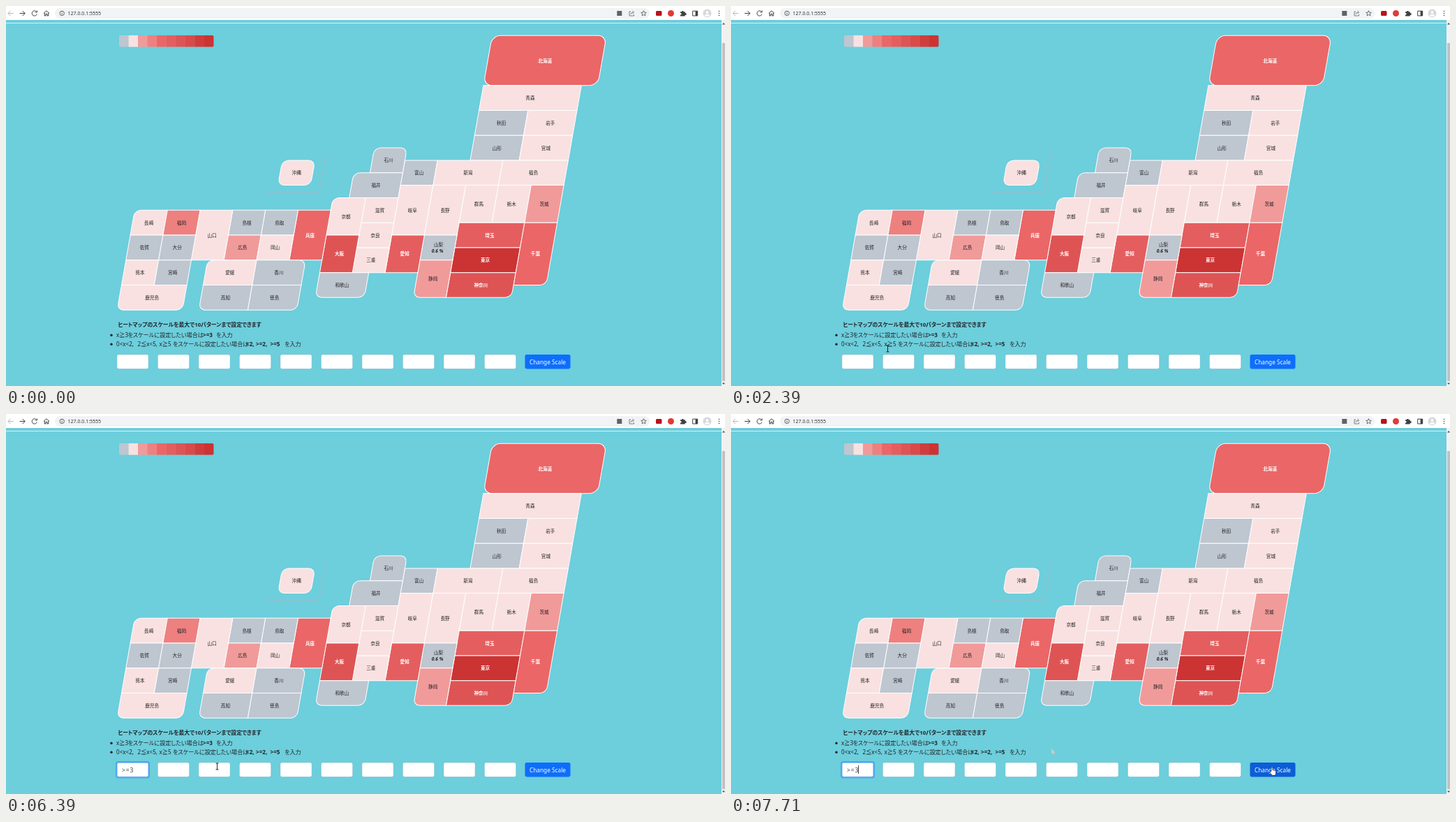
Animation of 1030 by 544 pixels, one loop 8000 ms. Source, as an HTML page with a canvas:

```html
<!DOCTYPE html>
<html lang="ja">
<head>
<meta charset="utf-8">
<title>Heat map scale</title>
<style>
html, body { margin: 0; width: 100%; height: 100%; overflow: hidden; background: #6dcedc; }
canvas, svg { position: absolute; left: 0; top: 0; width: 1030px; height: 544px; display: block; }
svg { overflow: hidden; }
text { font-family: "Noto Sans", "Noto Sans CJK JP", sans-serif; font-size: 8.1px; fill: #212529; white-space: pre; }
.ja { font-feature-settings: "palt"; }
.bold { font-weight: 600; }
</style>
</head>
<body>
<canvas id="page" width="1030" height="544"></canvas>
<svg viewBox="0 0 1030 544">
  <g class="ja">
    <text class="bold" x="160.5" y="458.5" style="font-size:7.8px">ヒートマップのスケールを最大で10パターンまで設定できます</text>
    <text x="158" y="474">x≧3</text>
    <text x="174.5" y="474">をスケールに設定したい場合は</text>
    <text class="bold" x="282" y="474">&gt;=3</text>
    <text x="301" y="474">を入力</text>
    <text x="158" y="487">0&lt;x&lt;2,</text>
    <text x="188.5" y="487">2≦x&lt;5,</text>
    <text x="219.5" y="487">x≧5</text>
    <text x="239" y="487">をスケールに設定したい場合は</text>
    <text class="bold" x="344" y="487">&lt;2,</text>
    <text class="bold" x="358" y="487">&gt;=2,</text>
    <text class="bold" x="378.5" y="487">&gt;=5</text>
    <text x="399" y="487">を入力</text>
  </g>
  <g id="focus">
    <rect x="158" y="498" width="47" height="22.5" rx="3" fill="none" stroke="#0d6efd" stroke-opacity=".4" stroke-width="2"/>
    <rect x="159.2" y="499.4" width="44.6" height="19.8" rx="2" fill="none" stroke="#86b7fe" stroke-width=".8"/>
  </g>
  <text id="typed" x="166" y="512.7" style="font-size:8.5px;letter-spacing:.85px;fill:#3a3f44"></text>
  <rect id="caret" y="503" width=".9" height="12" fill="#222"/>
  <rect id="button" x="743.5" y="499" width="65" height="20.5" rx="2.4"/>
  <text x="776" y="512.7" text-anchor="middle" style="font-size:8.3px;fill:#fff">Change Scale</text>
  <path id="trail" transform="translate(459 478.5)" fill="#c9c8ca" d="M0 0V8.6L2 6.8 3.3 9.8 4.6 9.2 3.4 6.4H6Z"/>
  <g id="pointer" stroke-linejoin="round">
    <path id="arrow" fill="#fff" stroke="#222" stroke-width=".7" d="M0 0V8.6L2 6.8 3.3 9.8 4.6 9.2 3.4 6.4H6Z"/>
    <path id="beam" fill="none" stroke="#111" stroke-width=".9" d="M-2-4.5H2M0-4.5V4.5M-2 4.5H2"/>
    <path id="hand" fill="#fff" stroke="#222" stroke-width=".7" d="M-1 6V1Q-1 0 0 0T1 1V4.2Q2 3.6 2.6 4.5 3.6 4 4.2 5 5.6 4.6 5.6 6V8.6Q5.4 10.4 4.6 11.8H-.2Q-1.4 9.6-3 7.6-3.4 6.4-2.2 6.4Z"/>
  </g>
</svg>
<script>
const $ = id => document.getElementById(id);
const ctx = $('page').getContext('2d');
const SCALE = ['#bec6d0', '#f9e1e1', '#f19a9a', '#ee8080', '#eb6667',
               '#e45e5f', '#de5455', '#d94a4a', '#d03c3c', '#cc3333'];
const LEFT = 228.5, TOP = 42.3, COL = 46.8, ROW = 35.72, SLANT = Math.tan(Math.PI / 18);

// name, column, row, width, height, scale step, rounded corners (a b c d clockwise from top left)
const REGIONS = `北海道 10 0 3.5 2 4 abcd|青森 10 2 3 1 1|秋田 10 3 1.5 1 0|岩手 11.5 3 1.5 1 1
山形 10 4 1.5 1 0|宮城 11.5 4 1.5 1 1|富山 8 5 1 1 0|新潟 9 5 2 1 1|福島 11 5 2 1 1
石川 7 4.5 1 1 0 ab|福井 6.5 5.5 1.5 1 0 a|岐阜 8 6 1 2 1|長野 9 6 1 2 1|群馬 10 6 1 1.5 1
栃木 11 6 1 1.5 1|茨城 12 6 1 1.5 2|埼玉 10 7.5 2 1 5|東京 10 8.5 2 1 9|神奈川 10 9.5 2 1 6 c
千葉 12 7.5 1 2.5 4 c|山梨 9 8 1 1 0|静岡 9 9 1 1.5 2 d|愛知 8 8 1 1.5 5|三重 7 8.5 1 1 1
奈良 7 7.5 1 1 1|滋賀 7 6.5 1 1 1|京都 6 6.5 1 1.5 1 a|大阪 6 8 1 1.5 6|和歌山 6 9.5 1.5 1 0 cd
兵庫 5 7 1 2 4|鳥取 4 7 1 1 0|島根 3 7 1 1 0|山口 2 7 1 2 1|広島 3 8 1 1 2|岡山 4 8 1 1 1
長崎 0 7 1 1 1 a|福岡 1 7 1 1 3|佐賀 0 8 1 1 0|大分 1 8 1 1 0|熊本 0 9 1 1 1|宮崎 1 9 1 1 0
鹿児島 0 10 2 1 1 cd|愛媛 2.5 9 1.5 1 1 a|香川 4 9 1.5 1 0 b|高知 2.5 10 1.5 1 0 d
徳島 4 10 1.5 1 0 c|沖縄 4.25 5 1 1 1 abcd`.split(/[|\n]/).map(s => s.split(' '));

function box(x, y, w, h, r, fill) {
  ctx.beginPath();
  ctx.roundRect(x, y, w, h, r);
  ctx.fillStyle = fill;
  ctx.fill();
}
function line(d, color = '#3c4043', width = 1) {
  ctx.strokeStyle = color;
  ctx.lineWidth = width;
  ctx.stroke(new Path2D(d));
}
function shape(d, color) {
  ctx.fillStyle = color;
  ctx.fill(new Path2D(d));
}
function dot(x, y, r, color) {
  box(x - r, y - r, 2 * r, 2 * r, r, color);
}
function label(s, x, y, font, color, align = 'center') {
  ctx.font = font;
  ctx.fillStyle = color;
  ctx.textAlign = align;
  ctx.textBaseline = 'middle';
  ctx.fillText(s, x, y);
}

function drawToolbar() {
  box(0, 0, 1030, 20, 0, '#fff');
  box(70, 3, 852, 15, 7.5, '#f1f3f4');
  line('M10.5 10.5H3M6.3 7L2.8 10.5 6.3 14', '#b4b7ba');
  line('M19.5 10.5H27M23.7 7L27.2 10.5 23.7 14');
  line('M43.6 8.2A3.6 3.6 0 1 0 44.3 11.5M44.4 6.5V9H41.8');
  line('M54 10.5L58 6.8 62 10.5M55.2 9.8V14H57V11.4H59V14H60.8V9.8');
  line('M83.4 10.4A3.2 3.2 0 1 1 77 10.4A3.2 3.2 0 1 1 83.4 10.4M80.2 10V12.2M80.2 8.3V9.2', '#3c4043', .8);
  label('127.0.0.1:5555', 88.5, 10.5, '7px "Noto Sans", sans-serif', '#303336', 'left');
  box(875.3, 7, 7, 7, 0, '#5f6368');
  line('M895 8H893V14H899.5V12M894.8 12Q895 9 899 9M897.5 7L899.6 9 897.5 11', '#5f6368', .8);
  line('M913.5 6.7L914.6 9.2 917.3 9.4 915.2 11.2 915.9 13.9 913.5 12.4 911.1 13.9 911.8 11.2 909.7 9.4 912.4 9.2Z', '#4a4e52', .8);
  box(931, 7, 8.5, 7, 1.5, '#b8141d');
  dot(952.5, 10.5, 4.5, '#e23a35');
  shape('M966 8.3H968A1.4 1.4 0 1 1 970.8 8.3H972.8V10.2A1.4 1.4 0 1 1 972.8 12.8V14.4H966V12.5A1.3 1.3 0 1 0 966 10Z', '#3c4043');
  line('M983.7 7.2H990.7V14H983.7Z');
  box(987.6, 7.2, 3.1, 6.8, 0, '#3c4043');
  dot(1004.5, 10.5, 6, '#d5d8dc');
  dot(1004.5, 9, 1.9, '#fff');
  shape('M1001 14.2Q1001 11.8 1004.5 11.8T1008 14.2Q1004.5 16.4 1001 14.2Z', '#fff');
  for (const y of [7.5, 10.5, 13.5]) dot(1021.5, y, .8, '#3c4043');
}

function drawMap() {
  SCALE.forEach((c, i) => {
    const x = 162 + i * 13.53;
    box(x, 42, 13.7, 16.5, i == 0 ? [2, 0, 0, 2] : i == 9 ? [0, 2, 2, 0] : 0, c);
  });
  line('M458.5 210L448.5 267H373', '#a5b9c3', .9);
  for (const [name, col, row, w, h, step, corners = ''] of REGIONS) {
    const x = LEFT + col * COL, y = TOP + row * ROW, width = w * COL, height = h * ROW;
    const r = name == '北海道' ? 12 : 9;
    ctx.save();
    ctx.transform(1, 0, -SLANT, 1, SLANT * TOP, 0);
    box(x, y, width, height, [...'abcd'].map(c => corners.includes(c) ? r : 0), SCALE[step]);
    ctx.strokeStyle = '#fff';
    ctx.lineWidth = 1;
    ctx.stroke();
    ctx.restore();
    const cy = y + height / 2, cx = x + width / 2 - SLANT * (cy - TOP);
    const strong = step > 3, rate = name == '山梨';
    label(name, cx, cy - (rate ? 4.5 : 0), `${strong ? 700 : 400} 6.6px "Noto Sans CJK JP", sans-serif`, strong ? '#fff' : '#222');
    if (rate) label('0.6 %', cx - 1.5, cy + 5.5, 'italic 600 6.6px "Noto Sans", sans-serif', '#222');
  }
}

function drawPage() {
  box(0, 0, 1030, 544, 0, '#6dcedc');
  drawToolbar();
  box(0, 24, 1025, 1, 0, '#d3f0f4');
  box(1025, 20, 5, 524, 0, '#f1f1f1');
  box(1026, 53, 4, 484, 0, '#c1c1c1');
  shape('M1026 26.5L1028 24 1030 26.5ZM1026 539.5L1028 542 1030 539.5Z', '#505050');
  drawMap();
  dot(151, 471.3, 1.7, '#212529');
  dot(151, 484.3, 1.7, '#212529');
  for (let i = 0; i < 10; i++) {
    const x = 159 + i * 58.5;
    box(x, 499, 45, 20.5, 2.4, '#ced4da');
    box(x + .4, 499.4, 44.2, 19.7, 2, '#fff');
  }
}

// time, x, y
const PATH = [
  [640, 826, 535], [780, 800, 539], [1130, 680, 542.5], [1270, 490, 542], [1410, 294, 542],
  [1480, 272, 543], [1620, 190, 542], [1760, 117, 498], [1830, 112, 480], [1970, 130, 456],
  [2110, 175, 452], [2250, 223, 458], [2390, 224.5, 490.5], [2460, 210, 503], [2600, 177.5, 509.5],
  [6050, 177.5, 509.5], [6110, 182, 509.5], [6250, 225, 509], [6380, 302.5, 504.5], [6520, 400, 491],
  [6590, 459, 478.5], [6730, 503, 475], [6940, 503, 475], [7080, 633.5, 475.5], [7290, 700, 490],
  [7500, 752, 503], [7640, 775, 505.5], [8000, 775, 505.5]
];
const CARET = [[2800, 3330], [3860, 4540], [5070, 6060], [6590, 7120], [7650, 8000]];
const KEYS = [4010, 5200, 5530];
const CARET_X = [165.2, 171.2, 177.2, 182.2];
const HOVER_AT = 7450;
const clamp = v => Math.max(0, Math.min(1, v));
const within = (x, y, l, t, r, b) => x >= l && x <= r && y >= t && y <= b;
const show = (id, on) => $(id).style.display = on ? '' : 'none';

function pointerAt(t) {
  const q = Math.max(640, Math.floor((t - 10) / 70) * 70 + 10);
  const i = Math.max(1, PATH.findIndex(p => p[0] >= q));
  const [t0, x0, y0] = PATH[i - 1], [t1, x1, y1] = PATH[i];
  const k = clamp((q - t0) / (t1 - t0));
  return [x0 + (x1 - x0) * k, y0 + (y1 - y0) * k];
}
function pointerKind(x, y) {
  if (within(x, y, 743, 499, 809, 520)) return 'hand';
  const inField = within(x, y, 159, 499, 731, 520) && (x - 159) % 58.5 < 45;
  const onText = within(x, y, 160, 450, 356, 462) || within(x, y, 158, 465, 324, 477) || within(x, y, 158, 478, 423, 494);
  return inField || onText ? 'beam' : 'arrow';
}
function render(t) {
  const [x, y] = pointerAt(t), kind = pointerKind(x, y);
  show('pointer', t >= 650);
  $('pointer').setAttribute('transform', `translate(${x} ${y})`);
  for (const id of ['arrow', 'beam', 'hand']) show(id, id == kind);
  show('trail', t >= 6670);

  const typed = KEYS.filter(k => t >= k).length;
  $('typed').textContent = '>=3'.slice(0, typed);
  $('caret').setAttribute('x', CARET_X[typed]);
  show('caret', CARET.some(([a, b]) => t >= a && t < b));
  $('focus').setAttribute('opacity', clamp((t - 2780) / 150));

  const h = clamp((t - HOVER_AT) / 150);
  $('button').setAttribute('fill', `rgb(${13 - 2 * h}, ${110 - 16 * h}, ${253 - 38 * h})`);
}

drawPage();
const start = performance.now();
function tick() {
  render((performance.now() - start) % 8000);
  requestAnimationFrame(tick);
}
tick();
</script>
</body>
</html>
```
